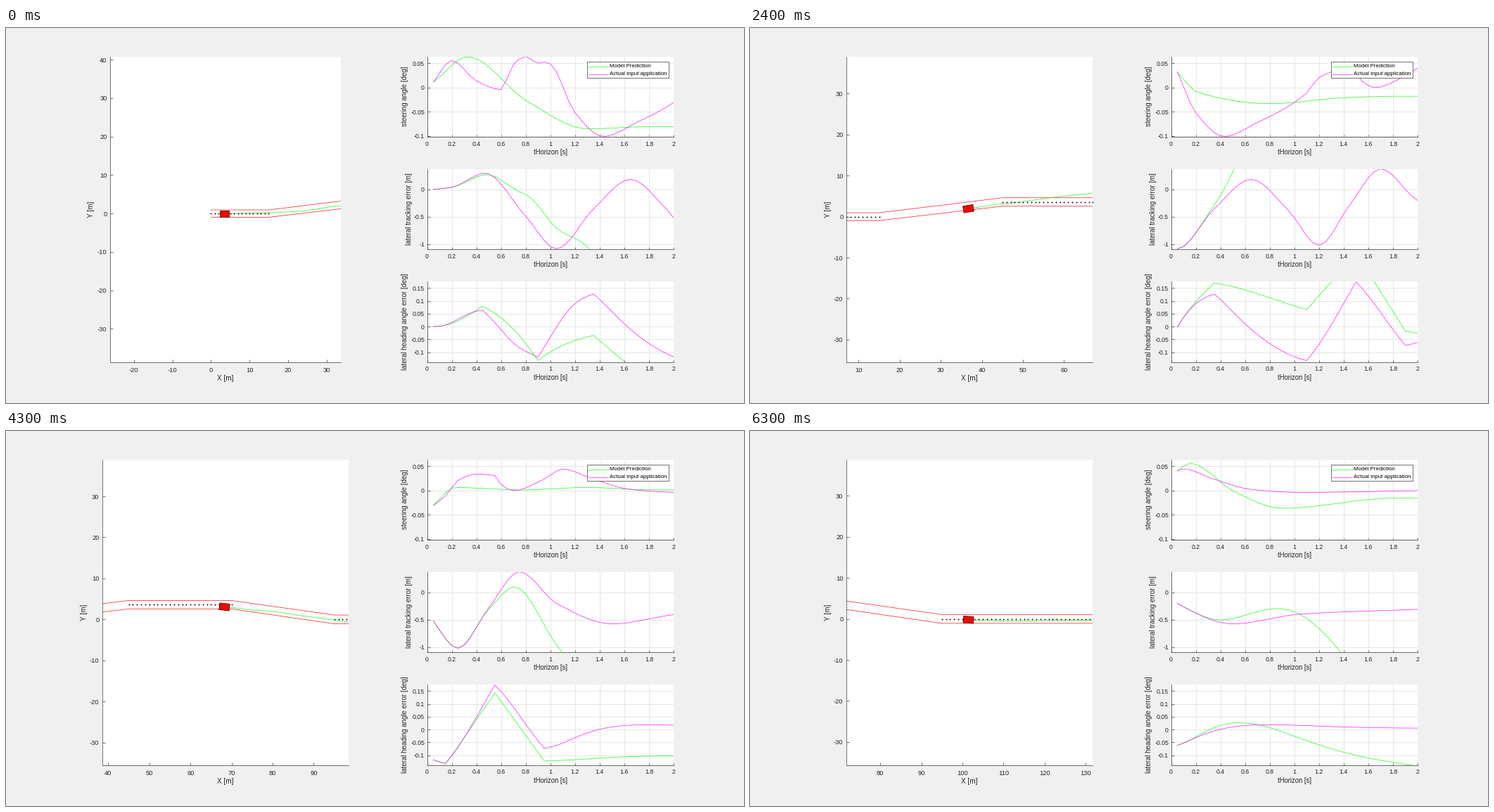
Write a matplotlib script that moves like this. It is 1049 px wide and 534 px high and loops after 6.4 s.

```python
import numpy as np
import matplotlib.pyplot as plt
from matplotlib.animation import FuncAnimation
from matplotlib.lines import Line2D
from matplotlib.patches import Polygon, Rectangle
from matplotlib.ticker import FuncFormatter

W, H, DPI = 1049, 534, 128
PX = 72 / DPI              # one pixel in points
THIN = .64 * PX
DT, N, STEPS = .05, 40, 60
SPEED, OFFSET, YAW_GAIN = 33.2, 3.575, 4.85
INK, GREEN, MAGENTA = "#262626", "#00ff00", "#ff00ff"

plt.rcParams.update({"font.family": "Liberation Sans", "axes.unicode_minus": False})

# key points (time, value) of the driven signals
STEER = [(.05, .011), (.2, .056), (.4, .014), (.6, -.004), (.7, .048), (.8, .0645),
         (.9, .0505), (.95, .053), (1, .049), (1.2, -.052), (1.43, -.101),
         (1.7, -.072), (2.1, -.011), (2.2, .021), (2.35, .0343), (2.5, .031),
         (2.55, .013), (2.65, 0), (2.9, .024), (3.05, .0447), (3.3, .0235),
         (3.6, .0025), (4, -.0036), (4.95, 0)]
LATERAL = [(.05, 0), (.2, .04), (.47, .297), (.8, -.49), (1.05, -1.085), (1.35, -.355),
           (1.65, .185), (1.95, -.38), (2.2, -1.02), (2.45, -.28), (2.7, .378),
           (3, -.2), (3.45, -.573), (4, -.395), (4.95, -.308)]
# planned steering: step, first turn (time, value), value halfway,
# second turn (time, value), settled value
PLANS = [(0, .33, .0638, -.0285, 1.3, -.085, -.0805),
         (6, .10, .034, -.032, .87, -.0645, -.0285),
         (14, .15, .073, -.056, 1.0, -.1005, -.094),
         (26, .27, -.0905, -.01, 1.8, .0585, .0585),
         (34, .25, -.034, 0, 1.2, .033, .0235),
         (44, .20, .047, .003, 1.4, -.02, -.0205),
         (59, .15, .0565, -.0035, .9, -.0365, -.0155)]


def smooth(x, y, q):
    """Monotone cubic interpolation."""
    x, y = np.asarray(x, float), np.asarray(y, float)
    h = np.diff(x)
    d = np.diff(y) / h
    m = np.zeros_like(y)
    m[0], m[-1] = d[0], d[-1]
    for i in range(1, len(h)):
        a, b = d[i - 1], d[i]
        if a * b > 0:
            w, v = 2 * h[i] + h[i - 1], h[i] + 2 * h[i - 1]
            m[i] = (w + v) / (w / a + v / b)
    i = np.clip(np.searchsorted(x, q, "right") - 1, 0, len(h) - 1)
    s = (q - x[i]) / h[i]
    return (y[i] * (1 + 2 * s) * (1 - s) ** 2 + y[i + 1] * s * s * (3 - 2 * s)
            + h[i] * s * (1 - s) * (m[i] * (1 - s) - m[i + 1] * s))


def integrate(f):
    """Integral that lags one sample behind."""
    return np.append(0, (np.cumsum(f) - f / 2)[:-1]) * DT


def ref_y(t):
    """Two lane changes, each with constant lateral acceleration up and down."""
    def rise(u):
        u = np.clip(u, 0, 1)
        return np.where(u < .5, 2 * u * u, 1 - 2 * (1 - u) ** 2)
    return OFFSET * (rise((t - .45) / .9) - rise((t - 2.1) / .8))


def ref_heading(t):
    def slope(u):
        return np.maximum(0, 2 * (1 - abs(2 * u - 1)))
    return OFFSET * (slope((t - .45) / .9) / .9 - slope((t - 2.1) / .8) / .8) / SPEED


t_all = DT * np.arange(1, STEPS + N)
t_hor = t_all[:N]
steer = smooth(*zip(*STEER), t_all)
lateral = smooth(*zip(*LATERAL), t_all)
yaw = YAW_GAIN * integrate(steer)
actual = [steer, lateral, yaw - ref_heading(t_all)]


def predict(k):
    """Planned steering and the errors that follow from it."""
    steps, *cols = zip(*PLANS)
    t1, v1, vm, t2, v2, end = (np.interp(k, steps, c) for c in cols)
    plan = smooth([DT, t1, (t1 + t2) / 2, t2, 1.82, 2],
                  [steer[k], v1, vm, v2, end, end], t_hor)
    turn = YAW_GAIN * integrate(plan - steer[k:k + N])
    return (plan, lateral[k:k + N] + SPEED * integrate(turn),
            actual[2][k:k + N] + turn)


fig = plt.figure(figsize=(W / DPI, H / DPI), dpi=DPI, facecolor="#f0f0f0")


def box(x0, y0, x1, y1):
    return [x0 / W, 1 - y1 / H, (x1 - x0) / W, (y1 - y0) / H]


def label(x, y, s, size, **kw):
    kw = {"ha": "center", "va": "center", "color": INK, **kw}
    return fig.text(x / W, 1 - y / H, s, fontsize=size * PX, **kw)


def make_axes(rect, size, tick, xpad, ypad):
    ax = fig.add_axes(box(*rect))
    ax.set_facecolor("white")
    ax.set_axisbelow(True)
    for side in ("top", "right"):
        ax.spines[side].set_visible(False)
    for side in ("left", "bottom"):
        ax.spines[side].set(color=INK, linewidth=THIN)
    ax.tick_params(direction="in", length=tick * PX, width=THIN, color=INK,
                   labelcolor=INK, labelsize=size * PX)
    ax.tick_params(axis="x", pad=xpad * PX)
    ax.tick_params(axis="y", pad=ypad * PX)
    for axis in (ax.xaxis, ax.yaxis):
        axis.set_major_formatter(FuncFormatter(lambda v, _: f"{round(v, 4) + 0:g}"))
    return ax


# road view
WIDE, FIRST = (136.5, 40.5, 487, 475.5), (147.5, 40.5, 476, 475.5)
road = make_axes(WIDE, 9.3, 4.3, 7.3, 4)
label(312, 499, "X [m]", 10)
y_label = label(111, 258, "Y [m]", 10, rotation=90)

ROAD_X = [0, 15, 45, 70, 95, 140]
CENTRE = np.array([0, 0, OFFSET, OFFSET, 0, 0])
HALF = np.array([.95, .95, 1.025, 1.025, 1.07, 1.07])
UPPER, LOWER = CENTRE + HALF, CENTRE - HALF
for edge in (UPPER, LOWER):
    road.plot(ROAD_X, edge, color="red", lw=THIN)
path, = road.plot([], [], color=GREEN, lw=THIN)
for a, b, y in ((0, 15, 0), (45, 70, OFFSET), (95, 140, 0)):
    xs = np.arange(a, b + 1)
    road.plot(xs, np.full(len(xs), y), "o", color="black", ms=1.9 * PX, mew=0)
car = Polygon(np.zeros((4, 2)), facecolor="red", edgecolor="black", lw=THIN, zorder=5)
road.add_patch(car)
CORNERS = np.array([[-1, -1], [1, -1], [1, 1], [-1, 1]]) * [1.24, .83]

# horizon plots
PLOTS = [(40.5, 154.5, (-.101, .0645), [-.1, -.05, 0, .05], "steering angle [deg]", 567.5),
         (200.5, 314.5, (-1.085, .378), [-1, -.5, 0], "lateral tracking error [m]", 572.5),
         (360.5, 475.5, (-.1375, .1765), [-.1, -.05, 0, .05, .1, .15],
          "lateral heading angle error [deg]", 567.5)]
curves = []
for top, bottom, ylim, yticks, text, x in PLOTS:
    ax = make_axes((598.5, top, 949, bottom), 8.8, 3.5, 6, 3.5)
    ax.set(xlim=(0, 2), ylim=ylim, xticks=np.arange(0, 2.01, .2), yticks=yticks)
    ax.grid(color="#dedede", lw=.75 * PX)
    curves.append([ax.plot([], [], color=c, lw=THIN)[0] for c in (GREEN, MAGENTA)])
    label(774, bottom + 22.3, "tHorizon [s]", 9.5)
    label(x, (top + bottom) / 2, text, 9.7, rotation=90)

x0, y0, w, h = box(825.5, 47.5, 941.5, 70.5)
fig.add_artist(Rectangle((x0, y0), w, h, transform=fig.transFigure,
                         facecolor="white", edgecolor=INK, lw=THIN))
for y, color, text in ((54.5, GREEN, "Model Prediction"),
                       (65.5, MAGENTA, "Actual input application")):
    fig.add_artist(Line2D([828 / W, 856 / W], [1 - y / H] * 2, color=color, lw=THIN))
    label(858, y, text, 7.9, ha="left", color="black")


def tens(lo, hi):
    return np.arange(np.ceil(lo / 10), np.floor(hi / 10) + 1) * 10


def draw(i):
    k = max(0, i - 4)      # the opening pose is held for 500 ms
    left, top, right, bottom = rect = FIRST if k == 0 else WIDE
    road.set_position(box(*rect))
    y_label.set_x((121.5 if k == 0 else 111) / W)

    # the view follows the car and centres on the visible road
    mid = 3.74 + 1.66 * k
    lo, hi = mid - 30, mid + 30
    seen = np.linspace(max(0, lo), hi, 500)
    y_mid = (np.interp(seen, ROAD_X, UPPER).max() + np.interp(seen, ROAD_X, LOWER).min()) / 2
    half = 30 * (bottom - top) / (right - left)
    road.set(xlim=(lo, hi), ylim=(y_mid - half, y_mid + half),
             xticks=tens(lo, hi), yticks=tens(y_mid - half, y_mid + half))

    plan = predict(k)
    base = ref_y(t_all[k:k + N] + DT)
    x, y = mid - .22, base[0] + lateral[k]
    c, s = np.cos(yaw[k]), np.sin(yaw[k])
    car.set_xy(CORNERS @ np.array([[c, s], [-s, c]]) + [x, y])
    path.set_data(x + SPEED * (t_hor - DT), base + plan[1])

    for (model, real), p, a in zip(curves, plan, actual):
        model.set_data(t_hor, p)
        real.set_data(t_hor, a[k:k + N])
    return []


anim = FuncAnimation(fig, draw, frames=64, interval=100, init_func=lambda: draw(0),
                     repeat=True, repeat_delay=0, blit=False)
plt.show()
```
